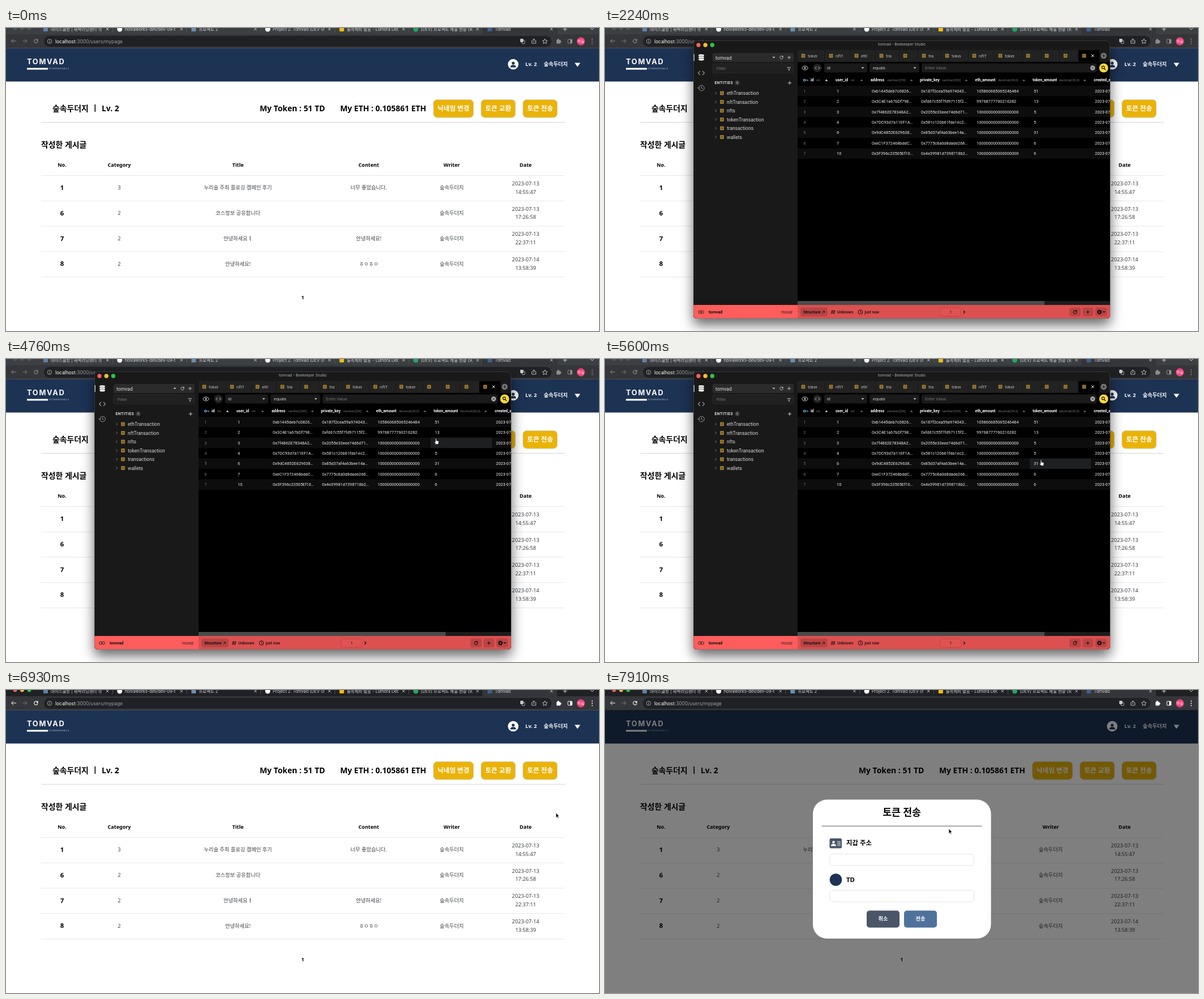
An HTML page that plays this animation: 1047x535 px, repeating every 8 s.

```html
<!DOCTYPE html>
<html lang="ko">
<head>
<meta charset="utf-8">
<style>
html, body { margin: 0; width: 100%; height: 100%; overflow: hidden; background: #fff; }
svg { display: block; }
text { white-space: pre; }
.n { font-family: 'Noto Sans', 'Noto Sans CJK KR', sans-serif; }
.r { font-family: Roboto, sans-serif; }
.i { font-family: Inter, 'Noto Sans CJK KR', sans-serif; }
</style>
</head>
<body>
<svg id="stage" width="1047" height="535" viewBox="0 0 1047 535"></svg>
<script>
const LOOP = 8000, STEP = 70;
const USER = '숲속두더지', NAVY = '#1d3354', GOLD = '#eab308', HOVER = '#1e1f21', STRIPE = '#0d0d0d';

// Drawing helpers; text is placed by the middle of its capitals.
const text = (font, x, y, str, size, fill = '#000', weight = 400, anchor = 'start', space = 0) =>
  `<text class="${font}" x="${x}" y="${y + size * .36}" font-size="${size}" fill="${fill}" font-weight="${weight}" text-anchor="${anchor}" letter-spacing="${space}">${str}</text>`;
const mid = (x, y, str, size, fill, weight) => text('n', x, y, str, size, fill, weight, 'middle');
const rob = (x, y, str, size, fill = '#fff', weight = 400) => text('r', x, y, str, size, fill, weight);
const rect = (x, y, w, h, fill, r = 0, more = '') =>
  `<rect x="${x}" y="${y}" width="${w}" height="${h}" rx="${r}" fill="${fill}" ${more}/>`;
const circle = (x, y, r, fill, more = '') => `<circle cx="${x}" cy="${y}" r="${r}" fill="${fill}" ${more}/>`;
const line = (d, color = 'currentColor', width = 1) =>
  `<path d="${d}" fill="none" stroke="${color}" stroke-width="${width}"/>`;
const shape = (d, fill) => `<path d="${d}" fill="${fill}"/>`;
const clip = (x, y, w, h, body) =>
  `<svg x="${x}" y="${y}" width="${w}" height="${h}" viewBox="${x} ${y} ${w} ${h}">${body}</svg>`;
const cross = (x, y, r, color, width) =>
  line(`M${x - r} ${y - r}l${2 * r} ${2 * r}m0 ${-2 * r}l${-2 * r} ${2 * r}`, color, width);
const plus = (x, y, r, color, width) => line(`M${x - r} ${y}h${2 * r}M${x} ${y - r}v${2 * r}`, color, width);
const reload = (x, y, r, color, width = 1.1) =>
  line(`M${x + r * .8} ${y - r * .6}A${r} ${r} 0 1 0 ${x + r} ${y + r * .2}`, color, width) +
  shape(`M${x + r * 1.1} ${y - r * 1.2}v${r * 1.1}h${-r * 1.1}z`, color);
const person = (x, y, k, fill) =>
  circle(x, y - 3 * k, 3 * k, fill) + shape(`M${x - 6 * k} ${y + 6 * k}q0-${5 * k} ${6 * k}-${5 * k}t${6 * k} ${5 * k}z`, fill);

function browser() {
  const tabs = [
    ['마이스쿨방 | 새싹러닝센터 학습', '#5f7fa8'], ['nolvaworks-dev/dev-09-t', '#fff'], ['프로젝트 2', '#6a8fb5'],
    ['Project 2. Tomvad (DEV 09', '#fff'], ['돌족제비 발표 - Lumora Decks', '#f5ba15'],
    ['[DEV] 프로젝트 제출 현황 (9/', '#23a566'], ['Tomvad', '#3d5f8f']];
  let s = rect(0, 0, 1047, 12, '#202124', 0, 'id="strip"') + rect(841, 0, 132, 12, '#35363a') + rect(0, 11, 1047, 25, '#35363a');
  tabs.forEach(([title, color], i) => {
    const x = 70 + i * 130.7;
    s += (i % 2 ? circle(x, 2, 4.5, color) : rect(x - 4, -3, 8, 9, color, 1)) +
      clip(x + 9, 0, 91, 11, text('i', x + 9, 2, title, 7.4, '#d5d7da')) +
      cross(x + 109, 2, 2.3, '#d5d7da', .9);
    if (i < 5) s += rect(x + 118, 0, .8, 7, '#5a5c60');
  });
  s += plus(987, 2, 3.5, '#d5d7da') + line('M1032 0l3 3 3-3', '#d5d7da');
  s += [16, 28.5, 41].map((x, i) => circle(x, 0, 3.4, '#55565a', `class="light" data-on="${['#ff5f57', '#febc2e', '#28c840'][i]}"`)).join('');
  s += rect(67, 14, 896, 19, '#202124', 9.5) +
    circle(77, 23.5, 3.8, 'none', 'stroke="#bbb" stroke-width=".8"') + line('M77 22.8v3M77 21v1', '#bbb', .9) +
    `<text class="i" x="87" y="26.6" font-size="8.4" fill="#9aa0a6"><tspan fill="#fff">localhost</tspan>:3000/users/mypage</text>`;
  s += line('M36.5 23h-7M33.5 19.5l3.5 3.5-3.5 3.5', '#77797c') +
    rect(908, 19, 5.5, 6, '#c8cacd', 1) + rect(911, 22, 5, 5.5, 'none', 1, 'stroke="#c8cacd" stroke-width=".8"') +
    line('M930 22h-1.5v5h7v-5H934M932 25v-6m-2 2l2-2 2 2', '#c8cacd', .9) +
    line('M951.5 19l1.3 3 3.2.3-2.4 2.1.7 3.1-2.8-1.7-2.8 1.7.7-3.1-2.4-2.1 3.2-.3z', '#c8cacd', .9);
  s += `<g id="tools">` + line('M18 23h-8M13 19.5L9.5 23l3.5 3.5') + reload(53, 23, 3.3, 'currentColor') +
    rect(972, 21, 7, 6.5, 'currentColor', 1) + circle(975, 20.5, 1.6, 'currentColor') + circle(979, 24, 1.6, 'currentColor') +
    rect(992, 20, 7.5, 7, 'none', 1, 'stroke="currentColor"') + rect(996, 20, 3.5, 7, 'currentColor') +
    [19.5, 23.5, 27.5].map(y => circle(1035, y, 1, 'currentColor')).join('') + `</g>`;
  return s + circle(1015, 23.5, 7.2, '#ec407a') + mid(1015, 23.5, '하늘', 6.4, '#fff');
}

function page() {
  let s = rect(0, 35, 1047, 500, '#fff') + rect(0, 35, 1047, 59.5, NAVY) + rect(0, 35, 1047, 1, '#4a4d55');
  s += text('i', 37, 59.5, 'TOMVAD', 12.8, '#fff', 700, 'start', 1.7) + rect(37, 70.5, 37, 3, '#fff') +
    text('i', 75.5, 72, 'STONEWEASELS', 3.5, '#c9d0da', 400, 'start', .65);
  s += circle(895.5, 64, 9.3, '#fff') + person(895.5, 64.5, .85, NAVY) + text('n', 917, 63.5, 'Lv. 2', 9.2, '#fff', 600) +
    text('n', 949.5, 63.5, USER, 9.2, '#fff', 600) + shape('M1004 61.5h10l-5 7z', '#fff');
  s += text('n', 82, 141.5, USER, 13.9, '#000', 600) + rect(156.5, 135, 1.6, 13, '#000') + text('n', 169, 141.5, 'Lv. 2', 13.9, '#000', 600) +
    text('n', 448, 141.5, 'My Token : 51 TD', 13.9, '#000', 600) + text('n', 590, 141.5, 'My ETH : 0.105861 ETH', 13.9, '#000', 600);
  [[754.5, 71, '닉네임 변경'], [838.5, 61, '토큰 교환'], [912.5, 61, '토큰 전송']].forEach(([x, w, label], i) =>
    s += rect(x, 126.3, w, 32, GOLD, 7, `id="btn${i}" stroke="#d9dce2"`) + mid(x + w / 2, 142, label, 11.6, '#fff', 700));
  s += rect(62, 166, 925, 1, '#d6d6d6') + text('n', 62, 205.5, '작성한 게시글', 13.9, '#000', 600);
  const cols = [99, 200, 409.5, 640.5, 787, 917.5];
  ['No.', 'Category', 'Title', 'Content', 'Writer', 'Date'].forEach((h, i) => s += mid(cols[i], 242, h, 9, '#000', 600));
  [[1, 3, '누리솔 주최 플로깅 캠페인 후기', '너무 좋았습니다.', '2023-07-13', '14:55:47'],
   [6, 2, '코스정보 공유합니다', '', '2023-07-13', '17:26:58'],
   [7, 2, '안녕하세요ㅕ', '안녕하세요!', '2023-07-13', '22:37:11'],
   [8, 2, '안녕하세요!', 'ㅎㅇㅎㅇ', '2023-07-14', '13:58:39']].forEach(([no, cat, title, content, day, hour], i) => {
    const y = 282 + i * 44.75, ink = '#3f4247';
    s += rect(62, y - 22, 924, 1, '#e5e7eb') + mid(99, y, no, 11.3, '#000', 600) +
      [cat, title, content, USER].map((v, k) => mid(cols[k + 1], y, v, 9.25, ink)).join('') +
      mid(917.5, y - 7.5, day, 9.25, ink) + mid(917.5, y + 7.3, hour, 9.25, ink);
  });
  return s + rect(62, 439, 924, 1, '#e5e7eb') + mid(524, 476, '1', 8.6, '#000', 600);
}

function modal() {
  const input = y => rect(397, y, 254.5, 20.5, '#fff', 5, 'stroke="#e2e5ea"');
  return rect(0, 35, 1047, 500, '#000', 0, 'opacity=".5"') + rect(367, 193.5, 314.5, 245.5, '#fff', 25) +
    mid(524, 216, '토큰 전송', 17.2, '#000', 600) + rect(382.5, 239.7, 283, 1.2, '#777') +
    rect(396.5, 262, 21.5, 17.5, '#4a5568', 2.5) + person(403.5, 271, .75, '#fff') + line('M410 268h6m-6 3h6m-6 3h6', '#fff', 1.1) +
    text('n', 426, 270, '지갑 주소', 11.4, '#000', 600) + input(289.5) +
    circle(407.5, 335, 10.8, NAVY) + text('n', 426, 334.5, 'TD', 11.4, '#000', 600) + input(353.5) +
    rect(462, 389.5, 58, 30, '#4a5568', 5) + mid(491, 404, '취소', 9.2, '#fff', 600) +
    rect(528, 389.5, 58, 30, '#4f729d', 5) + mid(557, 404, '전송', 9.2, '#fff', 600);
}

const ROW_TOP = 102, ROW_H = 18.4, EDGES = [360, 404, 465, 551, 648, 750, 858, 892];

function database() {
  const grid = (x, y) => rect(x - 3.2, y - 3.2, 6.4, 6.4, '#d8a63a', .8) + line(`M${x - 3} ${y - 1}h6m-6 2h6M${x - 1} ${y - 3}v6m2-6v6`, '#2a2210', .6);
  const caret = (x, y, c = '#ccc') => shape(`M${x - 2.5} ${y - 1.3}h5l-2.5 2.8z`, c);
  const up = (x, c = '#888') => shape(`M${x - 2.5} 93.5h5l-2.5-2.8z`, c);
  let s = rect(156, 22, 736, 491, '#191919') + rect(340, 38, 552, 452, '#000') + rect(340, 38, 552, 22, '#191919');
  s += ['#ff5f57', '#febc2e', '#28c840'].map((c, i) => circle(165 + i * 12.2, 30, 3.7, c)).join('') +
    text('i', 524, 28.5, 'tomvad - Beekeeper Studio', 6.5, '#b4b4b4', 400, 'middle');

  // Sidebar
  s += rect(156.5, 46, 1.2, 12, '#fff') + [48.5, 52, 55.5].map(y => `<ellipse cx="170" cy="${y}" rx="5.2" ry="2.4" fill="#fff" stroke="#191919" stroke-width=".7"/>`).join('') +
    line('M168 76l-3.5 3.5 3.5 3.5M172 76l3.5 3.5-3.5 3.5', '#999', 1.1) +
    circle(170.5, 106, 4.8, 'none', 'stroke="#999"') + line('M170.5 103v3.3l2.3 1.4M163.5 105l2 2 2-2', '#999');
  s += rect(190, 44, 143, 16, '#2b2b2b', 3) + rob(195, 52.5, 'tomvad', 8.6, '#ddd') + caret(298, 52) + reload(311.5, 52, 2.8, '#ccc', .9) + plus(325, 52, 3, '#ccc', .9) +
    rect(190, 63, 143, 16.5, '#202020', 3, 'stroke="#2f2f2f" stroke-width=".7"') + rob(197, 71.5, 'Filter', 7.4, '#777') + line('M322 69.5h5.5l-2.1 2.5v3l-1.3-.8V72z', '#bbb', .8);
  s += text('r', 193.5, 97, 'ENTITIES', 6.9, '#ddd', 700, 'start', .45) + rect(229, 92.5, 9, 8.5, '#333', 4) + rob(231.7, 97, '6', 6.3, '#bbb') + plus(326, 97, 3.2, '#ddd', .9);
  ['ethTransaction', 'nftTransaction', 'nfts', 'tokenTransaction', 'transactions', 'wallets'].forEach((name, i) => {
    const y = 115 + i * 15.5;
    s += line(`M194.5 ${y - 2.2}l2.2 2.2-2.2 2.2`, '#888', .9) + grid(206.5, y) + rob(215, y, name, 8.5, '#d6d6d6');
  });

  // Tabs
  const tabs = [340, 389, 434, 478, 520, 553, 594, 642, 688, 737, 770, 803, 836, 874];
  const names = ['token', 'nftT', 'ethT', 'trar', '', 'trar', 'token', 'nftT', 'token', '', '', '', ''];
  names.forEach((name, i) => {
    const x = tabs[i], w = tabs[i + 1] - x, last = i == 12;
    s += rect(x, 39, w - 1, 20.5, last ? '#000' : '#222') + grid(x + 10, 49) + clip(x + 17, 40, Math.max(8, w - 31), 18, rob(x + 18, 49, name, 7.7, '#bbb'));
  });
  s += cross(861, 49, 2.3, '#fff', 1) + circle(880.5, 49, 5.2, '#777') + plus(880.5, 49, 2.8, '#191919', 1);

  // Filter bar
  s += `<ellipse cx="353" cy="70.5" rx="5" ry="3.4" fill="none" stroke="#ddd"/>` + circle(353, 70.5, 1.5, '#ddd') +
    circle(375, 70.5, 7.5, '#222') + line('M373.5 68l-2.5 2.5 2.5 2.5M376.5 68l2.5 2.5-2.5 2.5', '#ddd', .9) +
    rect(387, 62.5, 76, 16, '#1a1a1a', 3) + rect(467, 62.5, 88, 16, '#1a1a1a', 3) + rect(559, 62.5, 309, 16, '#1a1a1a', 3) +
    rob(392, 70.5, 'id', 7.4, '#ccc') + caret(455, 70.5) + rob(473, 70.5, 'equals', 7.4, '#ccc') + caret(547, 70.5) + rob(565, 70.5, 'Enter Value', 7.4, '#777') +
    circle(861, 70.5, 4.2, '#aaa') + cross(861, 70.5, 1.6, '#1e1e1e', .9) +
    circle(880.5, 70.5, 8, '#fad83b') + circle(879.5, 69.5, 2.3, 'none', 'stroke="#111" stroke-width="1.2"') + line('M881.2 71.2l2.8 2.8', '#111', 1.3);

  // Table
  for (let i = 0; i < 7; i += 2) s += rect(340, ROW_TOP + i * ROW_H, 552, ROW_H, STRIPE);
  s += rect(340, 0, 552, ROW_H, STRIPE, 0, 'id="hotRow"') + rect(0, 0, 0, ROW_H, HOVER, 0, 'id="hotCell"');
  s += circle(352, 92, 1.7, 'none', 'stroke="#6cb8e6" stroke-width="1.2"') + line('M353.5 92h4.5v1.8', '#6cb8e6', 1.1);
  [[363, 'id', 373, 'int', 391], [407, 'user_id', 434, 'int', 453], [469, 'address', 498, 'varchar(255)', 541],
   [556, 'private_key', 595, 'varchar(255)', 638], [653.5, 'eth_amount', 694, 'decimal(20,0)', 739.5],
   [755, 'token_amount', 802, 'decimal(20,0)', 847], [863, 'created_at', 900, '', 920]].forEach(([x, name, tx, type, ax], i) =>
    s += rob(x, 92, name, 6.75, '#fff', 700) + rob(tx, 92, type, 5.9, '#777') + up(ax, i ? '#777' : '#fff'));
  const full = '100000000000000000', xs = [409, 471, 558, 656, 757, 865];
  [[1, '0xb1445deb7c0826…', '0x187f2cea59a974043…', '105860685065246484', 51], [2, '0x3C4E1a67bDf798…', '0xfd67c55f7fd97115f2…', '99768777760216282', 13],
   [3, '0x7f4862E78348A2…', '0x2055e33eee74d6d71…', full, 5], [4, '0x7DC93d7a11EF1A…', '0x581c120b61fda1ec2…', full, 5],
   [6, '0x9dC4852E629638…', '0x85d37af4a63bee14a…', full, 31], [7, '0xeC1F372468bddC…', '0x7775c8a0d8dade268…', full, 6],
   [10, '0x3F396c23505Ef10…', '0x4e39981d7398718b2…', full, 6]].forEach((row, i) => {
    const y = ROW_TOP + (i + .5) * ROW_H;
    s += rob(350.5, y, i + 1, 7, '#777') + [...row, '2023-07-13'].map((v, k) => rob(xs[k], y, v, 7.35, '#eee')).join('');
  });

  // Scrollbar and status bar
  s += rect(340, 482, 552, 7, '#1c1c1c') + rect(340, 482, 436, 7, '#4b4b4b') +
    rect(156, 489, 184, 24, '#ff5c5c') + rect(340, 489, 552, 24, '#dc5050') +
    rect(164.5, 499.3, 5.5, 4.4, 'none', 2.2, 'stroke="#222"') + rect(169, 499.3, 5.5, 4.4, 'none', 2.2, 'stroke="#222"') +
    rob(183, 501.5, 'tomvad', 7.3, '#111', 700) + rob(311, 501.5, 'mysql', 7.4, '#222') +
    rect(345, 493.5, 48, 15.5, '#bb4444', 4) + rob(350, 501.5, 'Structure', 7.3, '#111', 700) + line('M383.5 504l4-4m-3 0h3v3', '#111', .9) +
    line('M401.5 498l-1 7m4.5-7l-1 7M399 500h7.5m-8 3h7.5', '#111', .9) + rob(410, 501.5, 'Unknown', 6.8, '#111', 500) +
    circle(451, 501.5, 3.8, 'none', 'stroke="#111"') + line('M451 499v2.7l2 1', '#111', .9) + rob(458.5, 501.5, 'just now', 6.8, '#111', 500) +
    rect(592, 494, 36.5, 15, '#e05353', 3, 'stroke="#c24646"') + rob(608.5, 501.5, '1', 7.3, '#111') + line('M633 499l2.5 2.5-2.5 2.5', '#111', 1.1) +
    rect(820, 493.5, 20, 15.5, '#bb4444', 4) + rect(843, 493.5, 19, 15.5, '#bb4444', 4) + rect(865.5, 493.5, 21, 15.5, '#bb4444', 4) +
    reload(830, 501.5, 2.9, '#111') + plus(852.5, 501.5, 3, '#111', 1.1) +
    circle(873, 501.5, 2.5, 'none', 'stroke="#111" stroke-width="2"') + circle(873, 501.5, 3.7, 'none', 'stroke="#111" stroke-width="1.2" stroke-dasharray="1.5 1.4"') + caret(881, 501.5, '#111');

  return `<clipPath id="round"><rect x="156" y="22" width="736" height="491" rx="6"/></clipPath>` +
    rect(156, 22, 736, 491, '#111', 6, 'style="filter:drop-shadow(0 11px 11px rgba(0,0,0,.6))"') +
    `<g clip-path="url(#round)">${s}</g>` + rect(156.5, 22.5, 735, 490, 'none', 6, 'stroke="#666" stroke-opacity=".5" stroke-width=".8"');
}

stage.innerHTML = browser() + page() + `<g id="db">${database()}</g><g id="dialog">${modal()}</g>
  <g id="pointer"><path id="arrow" d="M0 0V8.6L1.9 6.8 3.2 9.8 4.6 9.2 3.3 6.3H6Z" fill="#000" stroke="#fff" stroke-width=".7"/>
  <path id="hand" d="M-.5 1Q-.5 0 .4 0T1.3 1V4L4.6 4.8Q5.6 5 5.4 6.3L4.8 10.5H.6L-2 7.2Q-2.4 6.2-1.6 6L-.5 6.8Z" fill="#fff" stroke="#111" stroke-width=".7"/></g>`;

// Pointer routes: time, x, y. The pointer is hidden outside them.
const routes = [
  [[70, 1012, 300], [280, 900, 461], [490, 560, 400], [630, 397, 200], [700, 450, 7], [840, 486, 246], [980, 486, 246], [1190, 784, 491], [1399, 784, 491]],
  [[2590, 749, 464], [2730, 720, 314], [2800, 720, 314], [2940, 871, 240], [3010, 556, 108], [3080, 556, 108], [3500, 700, 109], [3640, 775, 104], [3780, 776, 104],
   [3920, 768, 107], [4340, 754, 117], [4480, 754, 117], [5320, 768, 186], [5600, 769.5, 178], [5880, 765, 170], [6160, 757, 188], [6370, 750, 178], [6510, 750, 178],
   [6720, 971, 217], [7070, 971, 217], [7350, 955, 146], [7490, 953.5, 149], [7630, 950, 150], [7910, 607, 245], [8000, 607, 245]]];

function locate(t) {
  const route = routes.find(r => t >= r[0][0] && t < r[r.length - 1][0]);
  if (!route) return null;
  const i = route.findIndex(p => p[0] > t), [t0, x0, y0] = route[i - 1], [t1, x1, y1] = route[i];
  const k = (t - t0) / (t1 - t0);
  return [x0 + (x1 - x0) * k, y0 + (y1 - y0) * k];
}

const show = (el, on) => el.setAttribute('display', on ? 'inline' : 'none');
const lights = document.querySelectorAll('.light');

function draw(now) {
  const t = Math.floor(now % LOOP / STEP) * STEP;
  const dbOpen = t >= 2240 && t < 6930, focused = t >= 6930, dialogOpen = t >= 7630;
  const pos = locate(t), [x, y] = pos || [-99, -99];
  const inTable = dbOpen && x > EDGES[0] && x < 892 && y > 82 && y < ROW_TOP + 7 * ROW_H;
  const inHead = inTable && y < 104.5;
  const onButton = focused && !dialogOpen && x > 912 && x < 974 && y > 126 && y < 158;

  show(db, dbOpen);
  show(dialog, dialogOpen);
  strip.setAttribute('fill', focused ? '#202124' : '#3c4043');
  tools.style.color = focused ? '#fff' : '#8b8d90';
  lights.forEach(l => l.setAttribute('fill', focused ? l.dataset.on : '#55565a'));
  btn2.setAttribute('fill', onButton ? '#ca8a04' : GOLD);

  show(hotRow, inTable && !inHead);
  show(hotCell, inTable);
  if (inTable) {
    const top = inHead ? 82.5 : ROW_TOP + Math.floor((y - ROW_TOP) / ROW_H) * ROW_H;
    const col = EDGES.findIndex(e => e > x);
    hotRow.setAttribute('y', top);
    hotCell.setAttribute('y', top);
    hotCell.setAttribute('x', EDGES[col - 1]);
    hotCell.setAttribute('width', EDGES[col] - EDGES[col - 1]);
  }
  show(pointer, pos);
  pointer.setAttribute('transform', `translate(${x} ${y})`);
  show(hand, inTable || onButton);
  show(arrow, !inTable && !onButton);
  requestAnimationFrame(loop);
}
const start = performance.now();
const loop = () => draw(performance.now() - start);
loop();
</script>
</body>
</html>
```
